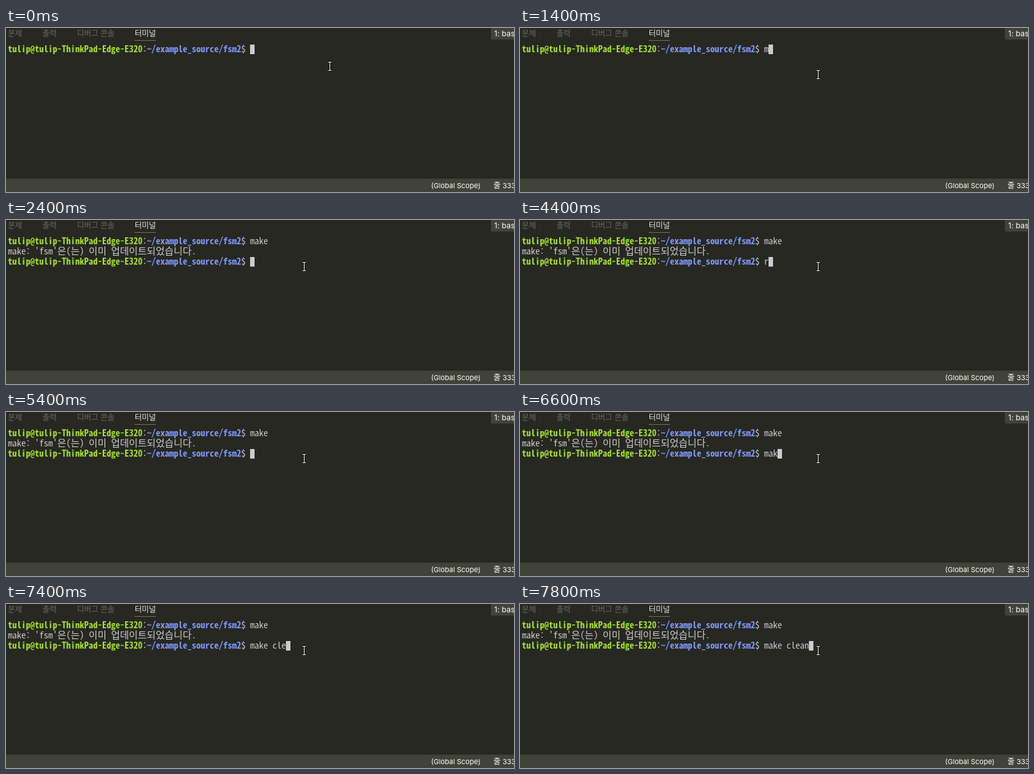
An HTML page that plays this animation: 793 by 257 pixels, repeating every 8000 ms.

```html
<!DOCTYPE html>
<html lang="ko">
<head>
<meta charset="utf-8">
<title>Terminal</title>
<style>
  html, body { margin: 0; width: 100%; height: 100%; overflow: hidden; background: #272822; }
  svg { display: block; }
  text { white-space: pre; }
  .ui { font: 12px Inter, "Noto Sans CJK KR", "Noto Sans CJK JP", sans-serif; fill: #fff; }
  .status { font-size: 11px; }
  .tab { font-family: "Noto Sans CJK KR", "Noto Sans CJK JP", sans-serif; fill: #6b6b62; }
  .active { fill: #e7e7e3; }
  .term { font: 14px "Noto Sans Mono CJK KR", "Noto Sans Mono CJK JP", "Noto Sans CJK KR", monospace; fill: #ccc; }
  .hangul { font-size: 15.2px; } /* two terminal columns per syllable */
  .user { font-weight: 700; fill: #a6e22e; }
  .path { font-weight: 700; fill: #819aff; }
  .bar { fill: #414339; }
</style>
</head>
<body>
<svg width="793" height="257" viewBox="0 0 793 257">
  <defs>
    <g id="prompt">
      <text class="user" x="3">tulip@tulip-ThinkPad-Edge-E320</text>
      <text x="213">:</text>
      <text class="path" x="220">~/example_source/fsm2</text>
      <text x="367">$</text>
    </g>
    <path id="beam" d="M-2.5 -6.5H2.5M0 -6V6M-2.5 6.5H2.5"/>
  </defs>

  <g class="ui">
    <text class="tab" x="3" y="13">문제</text>
    <text class="tab" x="57" y="13">출력</text>
    <text class="tab" x="111" y="13">디버그 콘솔</text>
    <text class="tab active" x="201" y="13">터미널</text>
    <rect x="201" y="19" width="33" height="1" fill="#75715e"/>
    <rect class="bar" x="757" width="36" height="18"/>
    <text x="762" y="13">1: bash</text>
    <rect class="bar" y="236" width="793" height="21"/>
    <text class="status" x="663.5" y="251">(Global Scope)</text>
    <text class="status" x="761" y="251"><tspan font-size="12">줄</tspan> 333</text>
  </g>

  <g class="term">
    <use href="#prompt" y="38"/>
    <text id="first" x="381" y="38"></text>
    <g id="result">
      <text x="3" y="54">make: 'fsm'<tspan class="hangul">은</tspan>(<tspan class="hangul">는</tspan>) <tspan class="hangul">이미</tspan> <tspan class="hangul">업데이트되었습니다</tspan>.</text>
      <use href="#prompt" y="70"/>
      <text id="second" x="381" y="70"></text>
    </g>
    <rect id="caret" width="7" height="15"/>
  </g>

  <g id="mouse" fill="none">
    <use href="#beam" stroke="#111" stroke-width="3"/>
    <use href="#beam" stroke="#fff"/>
  </g>
</svg>
<script>
  const LOOP = 8000, ENTER = 2400;
  const el = id => document.getElementById(id);

  // Each entry: start time in ms, then the value held from there on.
  const firstInput = [[0, ''], [1400, 'm'], [1600, 'ma'], [1800, 'make']];
  const secondInput = [
    [0, ''], [4400, 'r'], [5400, ''], [5600, 'm'], [5800, 'ma'],
    [6600, 'mak'], [6800, 'make'], [7000, 'make '], [7200, 'make c'],
    [7400, 'make cle'], [7600, 'make clea'], [7800, 'make clean']
  ];
  const mousePath = [[0, '505.5 60'], [200, '465.5 71'], [400, '465.5 73']];

  const at = (steps, t) => steps.filter(([start]) => start <= t).pop()[1];

  function draw(t) {
    const done = t >= ENTER;
    const first = at(firstInput, t), second = at(secondInput, t);
    el('first').textContent = first;
    el('second').textContent = second;
    el('result').setAttribute('visibility', done ? 'visible' : 'hidden');
    el('caret').setAttribute('x', 381 + 7 * (done ? second : first).length);
    el('caret').setAttribute('y', done ? 58 : 26);
    el('mouse').setAttribute('transform', `translate(${at(mousePath, t)})`);
  }

  const origin = performance.now();
  function frame() {
    draw((performance.now() - origin) % LOOP);
    requestAnimationFrame(frame);
  }
  frame();
</script>
</body>
</html>
```
